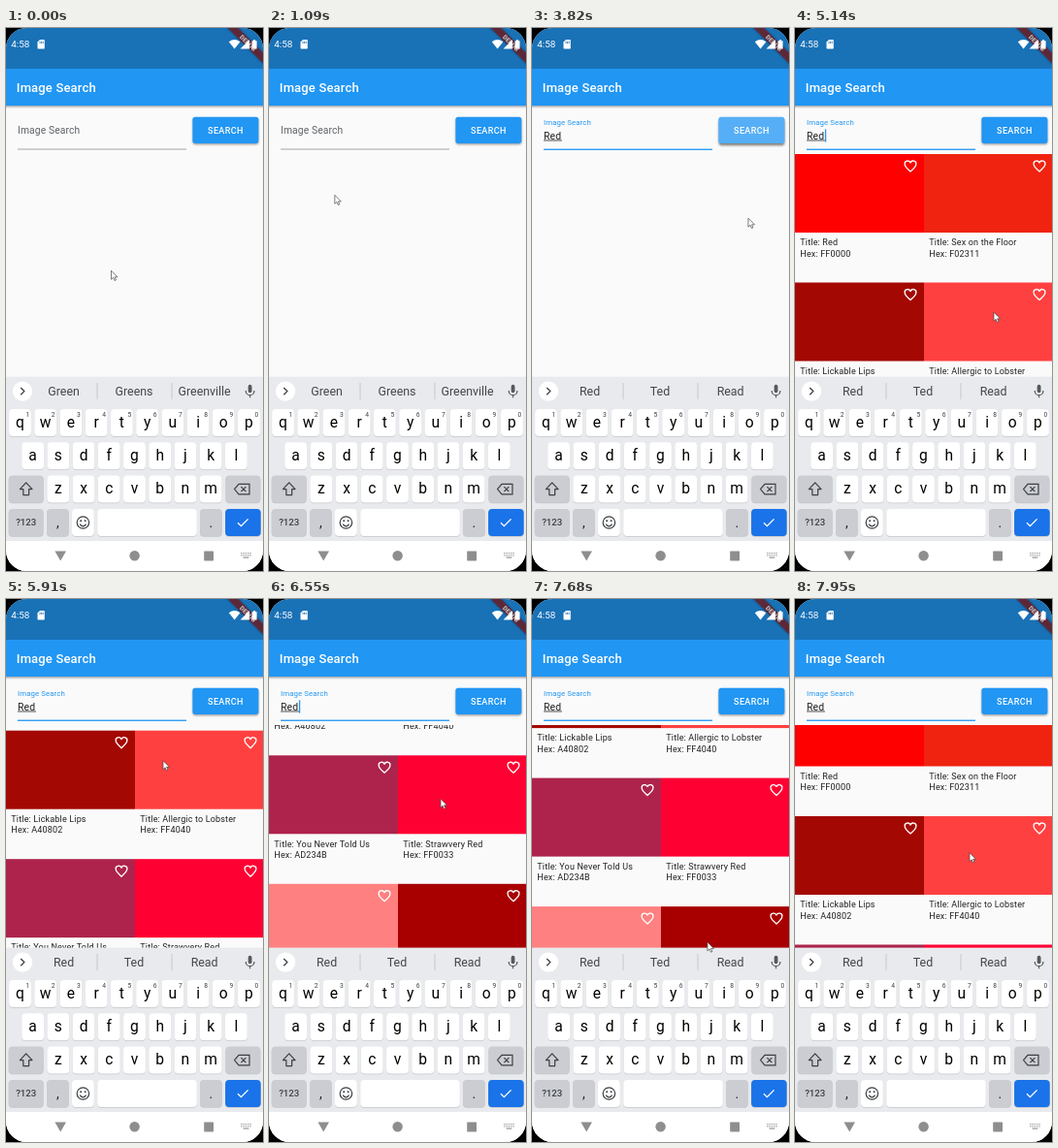
These frames come from a looping animation (265 by 560 pixels, 8 s). An HTML page:

```html
<!DOCTYPE html>
<html lang="en">
<head>
<meta charset="utf-8">
<title>Image Search</title>
<style>
  html, body { margin: 0; width: 100%; height: 100%; overflow: hidden; background: #000; }
  svg { display: block; width: 265px; height: 560px; }
  text { font-family: Roboto, "Noto Sans", sans-serif; white-space: pre; }
</style>
</head>
<body>
<svg id="stage" viewBox="0 0 265 560" xmlns="http://www.w3.org/2000/svg">
  <defs>
    <clipPath id="screen"><rect width="265" height="560" rx="21"/></clipPath>
    <clipPath id="listClip"><rect y="130" width="265" height="230"/></clipPath>
    <filter id="blur" x="-20%" y="-60%" width="140%" height="220%"><feGaussianBlur stdDeviation="1.3"/></filter>
  </defs>
</svg>
<script>
const NS = "http://www.w3.org/2000/svg";
const LOOP = 8000;
const BLUE = "#2196f3", INK = "#212121", GREY = "#5f6368";

function add(parent, tag, attrs = {}) {
  const el = document.createElementNS(NS, tag);
  set(el, attrs);
  parent.appendChild(el);
  return el;
}
function set(el, attrs) {
  for (const k in attrs) el.setAttribute(k, attrs[k]);
}
const group = (p, attrs) => add(p, "g", attrs);
const rect = (p, x, y, width, height, fill, rx = 0) => add(p, "rect", { x, y, width, height, fill, rx });
const circle = (p, cx, cy, r, fill) => add(p, "circle", { cx, cy, r, fill });
const shape = (p, d, fill) => add(p, "path", { d, fill });
const line = (p, d, stroke, w = 1.2, more = {}) =>
  add(p, "path", { d, fill: "none", stroke, "stroke-width": w, ...more });
function label(p, x, y, str, size, fill, more = {}) {
  const el = add(p, "text", { x, y, "font-size": size, fill, ...more });
  el.textContent = str;
  return el;
}
const MID = { "text-anchor": "middle" };
const show = (el, on) => el.setAttribute("visibility", on ? "visible" : "hidden");

const root = group(document.getElementById("stage"), { "clip-path": "url(#screen)" });
rect(root, 0, 0, 265, 560, "#fafafa");

// Result list
const listBox = group(root, { "clip-path": "url(#listClip)" });
const list = group(listBox);
const PITCH = 132.5, COLUMN = 133;
const colors = [
  ["Red", "FF0000"], ["Sex on the Floor", "F02311"],
  ["Lickable Lips", "A40802"], ["Allergic to Lobster", "FF4040"],
  ["You Never Told Us", "AD234B"], ["Strawvery Red", "FF0033"],
  ["watermelon guts", "FF8080"], ["Asian Red", "A80000"],
  ["", "BB2A4E"], ["", "E45635"]
];
colors.forEach(([name, hex], i) => {
  const x = (i % 2) * COLUMN;
  const y = 130 + Math.floor(i / 2) * PITCH;
  const card = group(list, { transform: `translate(${x} ${y})` });
  rect(card, 0, 0, COLUMN, 81, "#" + hex);
  line(card, "M12 19.8C6 14.5 3 11.8 3 8.5A4.6 4.6 0 0 1 12 6.4A4.6 4.6 0 0 1 21 8.5C21 11.8 18 14.5 12 19.8Z",
    "#fff", 2, { transform: "translate(111.3 5.2) scale(.644)" });
  if (name) {
    const font = { "letter-spacing": .16 };
    label(card, 5.3, 94.3, "Title: " + name, 9.02, INK, font);
    label(card, 5.3, 105.6, "Hex: " + hex, 9.02, INK, font);
  }
});

// Search field
const hint = label(root, 0, 0, "Image Search", 10.3, GREY, { "letter-spacing": .13 });
const fieldLine = rect(root, 12, 124.6, 174, .8, "#8e8e8e");
const typed = label(root, 12, 114.5, "", 10.4, INK, { "letter-spacing": .13 });
const typedLine = rect(root, 12, 115.6, 19, .8, INK);
const caret = rect(root, 31, 104.4, 1.3, 13.2, BLUE);

// Search button
const buttonShadow = add(root, "rect", {
  x: 192.6, y: 93.2, width: 67.8, height: 27, rx: 2.6, fill: "#000", opacity: .38, filter: "url(#blur)"
});
rect(root, 192.4, 91.7, 68, 27.2, BLUE, 2.6);
const glow = rect(root, 192.4, 91.7, 68, 27.2, "#fff", 2.6);
label(root, 226.4, 108.7, "SEARCH", 9.02, "#fff", { ...MID, "font-weight": 500, "letter-spacing": .35 });

// App bar and status bar
add(root, "rect", { x: -6, y: 42, width: 277, height: 39.2, fill: "#000", opacity: .4, filter: "url(#blur)" });
rect(root, 0, 0, 265, 80, BLUE);
label(root, 10.8, 66, "Image Search", 13, "#fff", { "font-weight": 500, "letter-spacing": .17 });
const banner = group(root, { transform: "translate(265 0) rotate(45)" });
add(banner, "rect", { x: -28, y: 18, width: 56, height: 8, fill: "#000", opacity: .35, filter: "url(#blur)" });
rect(banner, -28, 18, 56, 7.8, "rgba(183,28,28,.63)");
label(banner, 0, 24.2, "DEBUG", 6.5, "#fff", { ...MID, "font-weight": 900 });
add(root, "rect", { width: 265, height: 42, fill: "#000", opacity: .25 });
label(root, 5.2, 20.4, "4:58", 9.9, "#fff");
shape(root, "M35 12H39a.8.8 0 0 1 .8.8V20.7a.8.8 0 0 1-.8.8H33.3a.8.8 0 0 1-.8-.8V14.6Z", "#fff");
line(root, "M35 13.8V16M36.6 13.8V16M38.2 13.8V16", "#1970b6", .8);
shape(root, "M235.6 21.4L229.8 14.3Q235.6 9.8 241.4 14.3Z", "#fff");
shape(root, "M251 12V21.4H241.6Z", "#fff");
shape(root, "M253.6 13.2H255.1V12.1H257.1V13.2H258.6V21.4H253.6Z", "#fff");

// Keyboard
const keys = group(root);
rect(keys, 0, 359.6, 265, 169.4, "#e8eaed");
rect(keys, 0, 529, 265, 31, "#fff");
function key(cx, cy, w, fill = "#fff") {
  rect(keys, cx - w / 2, cy - 13.4, w, 28.2, "#c3c6ca", 4);
  rect(keys, cx - w / 2, cy - 14, w, 28, fill, 4);
}
function letters(str, x0, cy, pitch) {
  [...str].forEach((ch, i) => {
    const cx = x0 + i * pitch;
    key(cx, cy, 22.8);
    label(keys, cx, cy + 5, ch, 15.6, "#000", MID);
    if (str.length === 10) label(keys, cx + 8, cy - 5.6, (i + 1) % 10, 6.7, "#3c4043", MID);
  });
}
const DIM = "#cbcdd2";
letters("qwertyuiop", 14.5, 407, 26.22);
letters("asdfghjkl", 27.6, 441.2, 26.22);
letters("zxcvbnm", 53.8, 475.4, 26.22);
key(20.7, 475.4, 36, DIM);
line(keys, "M20.7 468.8L27 475.6H23.6V481.6H17.8V475.6H14.4Z", "#3c4043", 1.2, { "stroke-linejoin": "round" });
key(244.4, 475.4, 36, DIM);
line(keys, "M240 470.4H251V480.8H240L235.6 475.6ZM242.4 473.2L247.4 478.2M247.4 473.2L242.4 478.2", "#3c4043", 1.2);
key(20.7, 510, 36, DIM);
label(keys, 20.7, 513.4, "?123", 9.6, "#3c4043", { ...MID, "font-weight": 500 });
key(53.4, 510, 22.8, DIM);
label(keys, 53.4, 514.5, ",", 14, INK, MID);
key(79.4, 510, 22.8);
add(keys, "circle", { cx: 79.4, cy: 510, r: 6.2, fill: "none", stroke: "#3c4043", "stroke-width": 1.2 });
circle(keys, 77.2, 508.2, 1, "#3c4043");
circle(keys, 81.6, 508.2, 1, "#3c4043");
line(keys, "M76.2 511.6Q79.4 516.2 82.6 511.6", "#3c4043", 1.2);
key(145.5, 510, 102.6);
key(211.4, 510, 22.8, DIM);
label(keys, 211.4, 514.5, ".", 14, INK, MID);
key(244.4, 510, 36.6, "#1a73e8");
line(keys, "M239 510.2L242.4 513.6L249.6 506.4", "#fff", 1.3);

// Navigation row
const NAV = "#8e8e8e";
shape(keys, "M50.4 539.6H62L56.2 549.4Z", NAV);
circle(keys, 132.6, 544.3, 5.2, NAV);
rect(keys, 204.2, 539.6, 9.8, 9.8, NAV, .6);
for (const y of [541.6, 543.8])
  line(keys, `M242.2 ${y}H253`, "#9a9a9a", 1.3, { "stroke-dasharray": "1.3 1" });
line(keys, "M244.6 546.2H250.4", "#9a9a9a", 1.2);

// Strip above the keys
circle(keys, 17, 374.6, 10.2, "#fff");
const chevron = line(keys, "M-1.8 -3.6L1.8 0L-1.8 3.6", "#3c4043", 1.3);
rect(keys, 249.7, 367.8, 3.8, 8.4, "#55595e", 1.9);
line(keys, "M247.3 374V374.4A4.3 4.3 0 0 0 255.9 374.4V374M251.6 378.7V381.2", "#55595e", 1.2);

const words = group(keys);
const slots = [59.6, 132, 204.6].map(x => label(words, x, 379.2, "", 12.4, "#44474b", MID));
rect(words, 93.6, 366, .8, 17, "#bfc2c6");
rect(words, 170.6, 366, .8, 17, "#bfc2c6");

const tools = group(keys);
add(tools, "circle", { cx: 50.8, cy: 373, r: 3.7, fill: "none", stroke: GREY, "stroke-width": 1.3 });
line(tools, "M53.5 375.7L58 380.2", GREY, 1.5);
line(tools, "M85.6 369.4H94.6V376L91.4 379.6H85.6ZM91.4 379.4V376.2H94.4", GREY, 1.2, { "stroke-linejoin": "round" });
circle(tools, 88.2, 372.6, .8, GREY);
circle(tools, 91.8, 372.6, .8, GREY);
line(tools, "M87.4 375Q89.4 377.4 91 375.4", GREY, 1);
label(tools, 127.4, 378.2, "GIF", 9.6, GREY, { ...MID, "font-weight": 900, "letter-spacing": .4 });
line(tools, "M162 369.8H171V380H162Z", GREY, 1.2);
rect(tools, 164, 368, 5, 3.2, GREY, .8);
line(tools, "M164 373.6H169M164 375.6H169M164 377.6H167.4", GREY, .8);
rect(tools, 189.6, 366, .8, 17, "#bfc2c6");
for (const x of [209.4, 213.8, 218.2]) circle(tools, x, 374.6, 1.3, GREY);

const pointer = add(root, "path", {
  d: "M0 .2V9.2L2.1 7.3L3.5 10.5L5 9.8L3.6 6.8H6.5Z",
  fill: "#fff", stroke: "#444", "stroke-width": .7, "stroke-linejoin": "round"
});

// Motion tables: [time, values...]
const path = [
  [90, 108.5, 250], [500, 96.5, 215], [910, 96.5, 215], [1320, 27, 111],
  [1600, 27, 111], [2090, 72, 143], [2410, 71.5, 143], [3200, 140, 150],
  [3500, 222, 108], [3680, 223, 108], [3820, 223, 196], [4140, 205, 293],
  [5300, 205, 293], [5910, 162, 166.5], [6020, 163, 160], [6240, 178, 300],
  [6550, 177, 206], [6730, 174, 172], [6780, 174, 172], [7080, 176, 296],
  [7450, 174, 222], [7550, 174, 222], [7720, 182, 374], [7950, 180, 261.5]
];
const scroll = [
  [5300, 0], [5910, 126.8], [6020, 138], [6240, 140], [6550, 233.7],
  [6730, 267], [7080, 268.5], [7450, 342.5], [7550, 342.5], [7720, 190], [7950, 38.5]
];
const press = [[3560, 0], [3680, 1], [3900, 1], [4120, 0]];
const focus = [[1580, 0], [1760, 1]];
const FOCUS = 1580, TOOLS = 1700, RESULTS = 5140;
const typing = [[2600, "R", 18.6], [2840, "Re", 24.4], [3060, "Red", 30.9]];

function at(table, t) {
  const n = table.findIndex(k => k[0] > t);
  if (n === 0) return table[0].slice(1);
  if (n < 0) return table[table.length - 1].slice(1);
  const a = table[n - 1], b = table[n];
  const u = (t - a[0]) / (b[0] - a[0]);
  const e = u * u * (3 - 2 * u);
  return a.slice(1).map((v, i) => v + (b[i + 1] - v) * e);
}
const mix = (a, b, u) => a + (b - a) * u;

function caretOn(t) {
  if (t < FOCUS) return false;
  if (t < typing[0][0]) return t < 2090;
  if (t < 3560) return true;
  return t >= 4050 && (t - 4050) % 1020 < 500;
}

function draw(t) {
  const [x, y] = at(path, t);
  set(pointer, { transform: `translate(${x} ${y})` });

  const [f] = at(focus, t);
  const tint = [[95, 33], [99, 150], [104, 243]].map(([a, b]) => Math.round(mix(a, b, f)));
  set(hint, { transform: `translate(12 ${mix(108.7, 100.2, f)}) scale(${mix(1, .76, f)})`, fill: `rgb(${tint})` });
  set(fieldLine, { height: mix(.8, 1.3, f), fill: f > 0 ? BLUE : "#8e8e8e" });

  const entry = typing.filter(k => k[0] <= t).pop();
  const end = entry ? entry[2] : 12;
  typed.textContent = entry ? entry[1] : "";
  set(typedLine, { width: end - 12 });
  set(caret, { x: end });
  show(caret, caretOn(t));

  const [p] = at(press, t);
  set(glow, { opacity: .24 * p });
  set(buttonShadow, { y: 93.2 + p, opacity: .38 + .1 * p });

  const toolbar = t >= TOOLS && !entry;
  show(tools, toolbar);
  show(words, !toolbar);
  set(chevron, { transform: `translate(17 374.6) scale(${toolbar ? -1 : 1} 1)` });
  const picks = entry ? ["Red", "Ted", "Read"] : ["Green", "Greens", "Greenville"];
  slots.forEach((s, i) => { s.textContent = picks[i]; });

  show(listBox, t >= RESULTS);
  set(list, { transform: `translate(0 ${-at(scroll, t)[0]})` });
}

const start = performance.now();
function tick() {
  draw((performance.now() - start) % LOOP);
  requestAnimationFrame(tick);
}
tick();
</script>
</body>
</html>
```
